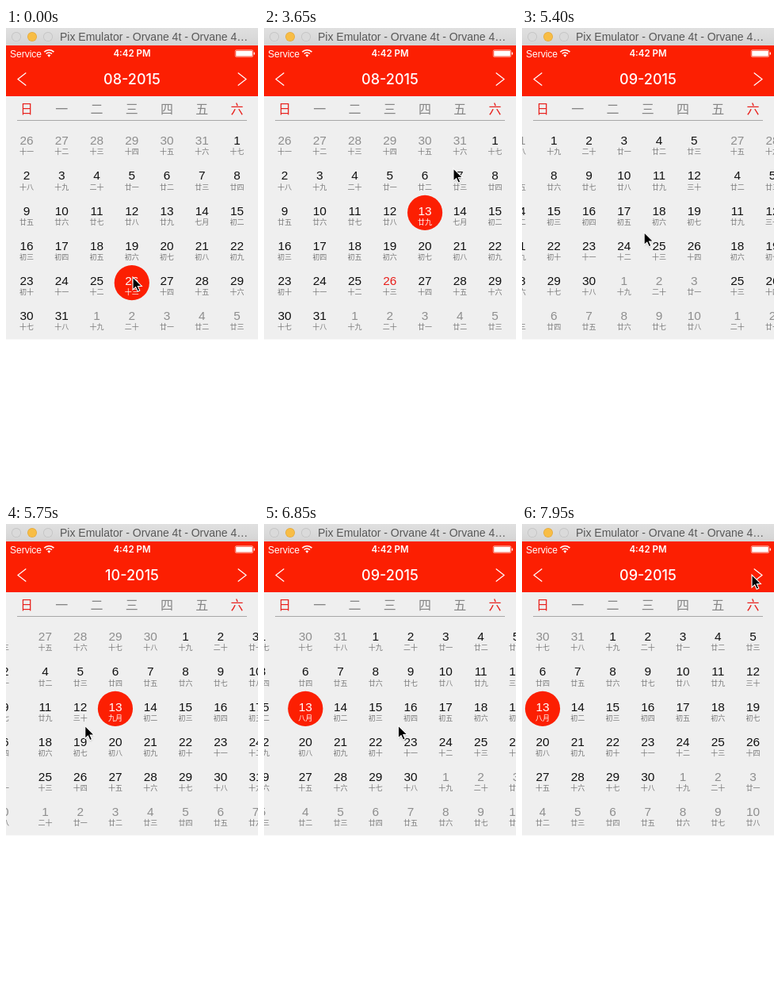
These frames come from a looping animation (318 by 590 pixels, 8 s). An HTML page with a canvas:

```html
<!DOCTYPE html>
<html lang="zh-CN">
<head>
<meta charset="utf-8">
<title>Calendar</title>
<style>
html, body { margin: 0; width: 100%; height: 100%; overflow: hidden; background: #fff; }
canvas { display: block; width: 318px; height: 590px; }
</style>
</head>
<body>
<canvas id="stage"></canvas>
<script>
const W = 318, H = 590, LOOP = 8000;
const PAGE = 320, COL = 44.27, ROW = 44.2;
const RED = '#fc1f02', TODAY_RED = '#e8201c', GRAY = '#8e8e8e';
const SANS = '"Liberation Sans", Arial, sans-serif';
const MEDIUM = 'Inter, "Liberation Sans", sans-serif';
const CJK = '"Noto Sans CJK SC", "Noto Sans CJK", "Noto Sans CJK JP", sans-serif';
const DAY_MS = 864e5;

const canvas = document.getElementById('stage');
const ctx = canvas.getContext('2d');
const dpr = window.devicePixelRatio || 1;
canvas.width = W * dpr;
canvas.height = H * dpr;

// Easing names: l linear, s smooth, o ease-out
const ease = {
  l: u => u,
  s: u => u * u * (3 - 2 * u),
  o: u => 1 - (1 - u) ** 3
};

// [time, x, y, easing into this point]
const cursorKeys = [
  [0, 160, 314, 'l'], [500, 160, 314, 'l'], [1150, 248, 272, 's'], [1650, 248, 272, 'l'],
  [1900, 248, 254, 'l'], [2150, 248, 228, 'o'], [2650, 248, 228, 'l'], [2850, 206, 226, 's'],
  [3200, 206, 226, 'l'], [3650, 239, 177, 's'], [4150, 235, 257, 's'], [4500, 120, 257, 'l'],
  [4650, 108, 257, 'o'], [5150, 229, 257, 's'], [5400, 154.5, 257.5, 'l'], [5550, 99, 256, 'l'],
  [6030, 101, 252, 's'], [6200, 226, 252, 'l'], [6280, 249, 252, 'l'], [6760, 143, 254, 's'],
  [6850, 169, 254, 'l'], [7000, 224, 254, 'l'], [7300, 228, 253, 'o'], [7850, 290, 64, 's']
];

// [time, page, easing]; page 0 is August
const scrollKeys = [
  [4150, 0, 'l'], [4500, 0.36, 'l'], [4950, 1, 'o'], [5150, 1, 'l'],
  [5400, 1.231, 'l'], [5550, 1.406, 'l'], [5950, 2, 'o'], [6030, 2, 'l'],
  [6200, 1.609, 'l'], [6280, 1.5375, 'l'], [6680, 1, 'o'], [6760, 1, 'l'],
  [6850, 0.919, 'l'], [7000, 0.747, 'l'], [7550, 1, 'o']
];

// [time, selected day of the month]
const picks = [[-1000, 26], [1250, 21], [2250, 14], [2900, 13]];

function sample(keys, t) {
  const size = keys[0].length - 1;
  const i = keys.findIndex(k => k[0] > t);
  if (i === 0) return keys[0].slice(1, size);
  if (i < 0) return keys[keys.length - 1].slice(1, size);
  const a = keys[i - 1], b = keys[i];
  const u = ease[b[size]]((t - a[0]) / (b[0] - a[0]));
  return a.slice(1, size).map((v, n) => v + (b[n + 1] - v) * u);
}

function text(str, x, y, font, color, align = 'center') {
  ctx.font = font;
  ctx.fillStyle = color;
  ctx.textAlign = align;
  ctx.fillText(str, x, y);
}

function disc(x, y, r, color) {
  ctx.fillStyle = color;
  ctx.beginPath();
  ctx.arc(x, y, r, 0, 2 * Math.PI);
  ctx.fill();
}

function line(color, width, ...pts) {
  ctx.strokeStyle = color;
  ctx.lineWidth = width;
  ctx.beginPath();
  pts.forEach(([x, y]) => ctx.lineTo(x, y));
  ctx.stroke();
}

const utc = (m, d) => Date.UTC(2015, m, d);
const lunarStarts = [
  [utc(6, 16), '六月'], [utc(7, 14), '七月'], [utc(8, 13), '八月'],
  [utc(9, 13), '九月'], [utc(10, 12), '十月']
];

function lunar(time) {
  const [start, name] = lunarStarts.filter(s => s[0] <= time).pop();
  const n = Math.round((time - start) / DAY_MS) + 1;
  if (n === 1) return name;
  if (n === 20) return '二十';
  if (n === 30) return '三十';
  return (n <= 10 ? '初' : n < 20 ? '十' : '廿') + '一二三四五六七八九十'[(n - 1) % 10];
}

function drawPage(page, left, selected, scale) {
  const month = 7 + page;
  const first = utc(month, 1);
  const start = first - new Date(first).getUTCDay() * DAY_MS;
  for (let i = 0; i < 42; i++) {
    const x = left + 26 + (i % 7) * COL;
    if (x < -25 || x > W + 25) continue;
    const y = 142 + Math.floor(i / 7) * ROW;
    const time = start + i * DAY_MS;
    const date = new Date(time);
    const day = date.getUTCDate();
    const inside = date.getUTCMonth() === month;
    const on = inside && day === selected;
    if (on) disc(x, y + 2.4, 22.1 * scale, RED);
    const today = time === utc(7, 26);
    const color = on ? '#fff' : today ? TODAY_RED : inside ? '#111' : GRAY;
    text(day, x, y + 5.1, '15.4px ' + SANS, color);
    text(lunar(time), x, y + 17.4, '9px ' + CJK, on ? '#fff' : '#777');
  }
}

function drawTitleBar() {
  const g = ctx.createLinearGradient(0, 0, 0, 22);
  g.addColorStop(0, '#e0e0e0');
  g.addColorStop(1, '#d4d4d4');
  ctx.fillStyle = g;
  ctx.fillRect(0, 0, W, 22);
  ['#dadada', '#f8bd45', '#dadada'].forEach((color, i) => {
    const x = 13 + 20 * i;
    disc(x, 11, 6, i === 1 ? '#e5a93a' : '#c2c2c2');
    disc(x, 11, 5.2, color);
  });
  text('Pix Emulator - Orvane 4t - Orvane 4…', 68, 16.3, '14px ' + SANS, '#585858', 'left');
}

function drawBattery() {
  ctx.strokeStyle = 'rgba(255,255,255,.6)';
  ctx.lineWidth = 0.8;
  ctx.beginPath();
  ctx.roundRect(289.2, 27.6, 22.6, 9, 1.8);
  ctx.stroke();
  ctx.fillStyle = '#fff';
  ctx.fillRect(290.2, 28.6, 20.6, 7);
  ctx.fillRect(312.6, 30.6, 1.3, 3);
}

function drawHeader(page) {
  ctx.fillStyle = RED;
  ctx.fillRect(0, 22, W, 64);
  text('Service', 5, 36.5, '12px ' + SANS, '#fff', 'left');
  text('4:42 PM', 159, 36.3, '600 11.5px ' + MEDIUM, '#fff');

  // Wi-Fi
  ctx.strokeStyle = '#fff';
  ctx.lineWidth = 1.6;
  for (const r of [5, 8.3]) {
    ctx.beginPath();
    ctx.arc(54.3, 36, r, -Math.PI * 0.76, -Math.PI * 0.24);
    ctx.stroke();
  }
  ctx.fillStyle = '#fff';
  ctx.beginPath();
  ctx.moveTo(54.3, 36.8);
  ctx.arc(54.3, 36, 2.6, -Math.PI * 0.78, -Math.PI * 0.22);
  ctx.fill();

  drawBattery();
  line('#fff', 1.2, [25.3, 56.5], [15, 64.5], [25.3, 72.5]);
  line('#fff', 1.2, [292.7, 56.5], [303, 64.5], [292.7, 72.5]);
  text(`0${8 + page}-2015`.slice(-7), 159, 71, '500 18px ' + MEDIUM, '#fff');
}

function drawCursor(x, y) {
  ctx.save();
  ctx.translate(x, y);
  ctx.beginPath();
  [[0, 0], [0, 16], [3.7, 12.6], [6.2, 18.2], [8.8, 17], [6.4, 11.6], [11.4, 11.4]]
    .forEach(([px, py]) => ctx.lineTo(px, py));
  ctx.closePath();
  ctx.shadowColor = 'rgba(0,0,0,.3)';
  ctx.shadowBlur = 2 * dpr;
  ctx.shadowOffsetY = dpr;
  ctx.fillStyle = '#000';
  ctx.fill();
  ctx.shadowColor = 'transparent';
  ctx.strokeStyle = '#fff';
  ctx.lineWidth = 1.1;
  ctx.stroke();
  ctx.restore();
}

function draw(t) {
  const [scroll] = sample(scrollKeys, t);
  const page = Math.round(scroll);
  const [picked, day] = picks.filter(p => p[0] <= t).pop();
  const scale = Math.min(1, 0.3 + 0.7 * (t - picked) / 150);

  ctx.setTransform(dpr, 0, 0, dpr, 0, 0);
  ctx.fillStyle = '#fff';
  ctx.fillRect(0, 0, W, H);
  ctx.fillStyle = '#efefef';
  ctx.fillRect(0, 86, W, 306.5);

  for (let p = 0; p < 3; p++) {
    drawPage(p, (p - scroll) * PAGE, p === page ? day : 0, scale);
  }
  [...'日一二三四五六'].forEach((c, i) => {
    text(c, 26 + i * COL, 108, '300 16px ' + CJK, i % 6 ? '#858585' : TODAY_RED);
  });
  line('#a8a8a8', 1, [14, 116.5], [304, 116.5]);

  drawTitleBar();
  drawHeader(page);
  drawCursor(...sample(cursorKeys, t));
}

const began = performance.now();
function tick() {
  draw((performance.now() - began) % LOOP);
  requestAnimationFrame(tick);
}
tick();
</script>
</body>
</html>
```
